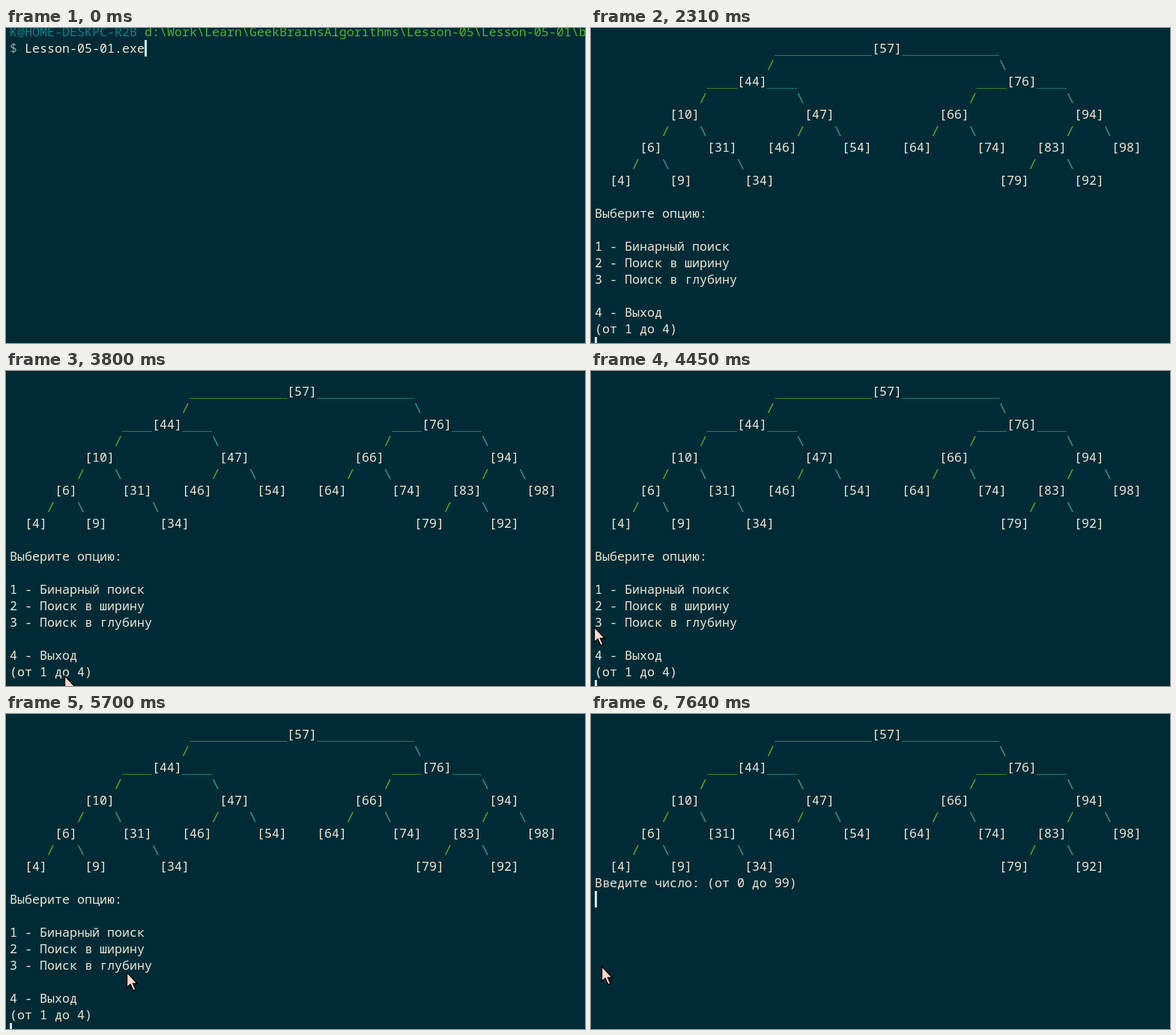
Recreate the animation shown at these times as an HTML page with a canvas. Size 773 by 420 pixels, loop 8000 ms.

```html
<!DOCTYPE html>
<html lang="ru">
<head>
<meta charset="utf-8">
<title>Terminal</title>
<style>
html, body { margin: 0; width: 100%; height: 100%; overflow: hidden; background: #002b36; }
canvas { display: block; }
</style>
</head>
<body>
<canvas id="stage" width="773" height="420"></canvas>
<script>
const ctx = document.getElementById('stage').getContext('2d');
const LOOP = 8000, CELL = 10, LINE = 22, LEFT = 5;
const COLOR = {
  back: '#002b36', text: '#eee8d5', green: '#4eb32b', cyan: '#2aa198',
  host: '#0b7f86', dollar: '#93a1a1', caret: '#cdeef5', pointer: '#ffd7cd'
};
const TEXT_FONT = `${CELL / 0.6}px "Noto Sans Mono", monospace`;
const ARM_FONT = `${CELL / 0.602}px "DejaVu Sans Mono", monospace`;

const MENU = [
  'Выберите опцию:', '',
  '1 - Бинарный поиск', '2 - Поиск в ширину', '3 - Поиск в глубину', '',
  '4 - Выход', '(от 1 до 4)'
];

const ARROW = new Path2D('M0 0V20L4.5 16L8.5 24.5L11.5 23L8 15H14Z');

function insert(node, value) {
  if (!node) return { value };
  const side = value < node.value ? 'left' : 'right';
  node[side] = insert(node[side], value);
  return node;
}
const root = '57 44 76 10 47 66 94 6 31 46 54 64 74 83 98 4 9 34 79 92'
  .split(' ').map(Number).reduce(insert, null);

function write(str, col, row, color, font = TEXT_FONT) {
  ctx.font = font;
  ctx.fillStyle = color;
  ctx.fillText(str, LEFT + col * CELL, 11 + row * LINE);
}

const label = node => `[${node.value}]`;

function drawTree(node, col, depth = 0) {
  const row = 1 + depth * 2;
  const arm = Math.max(0, Math.ceil(18 / 2 ** depth) - 5);
  const end = col + label(node).length;
  write(label(node), col, row, COLOR.text);
  if (node.left) {
    const elbow = col - arm - 1;
    write('_'.repeat(arm), col - arm, row, COLOR.green, ARM_FONT);
    write('/', elbow, row + 1, COLOR.green, ARM_FONT);
    drawTree(node.left, elbow - label(node.left).length, depth + 1);
  }
  if (node.right) {
    const elbow = end + arm;
    write('_'.repeat(arm), end, row, COLOR.cyan, ARM_FONT);
    write('\\', elbow, row + 1, COLOR.cyan, ARM_FONT);
    drawTree(node.right, elbow + 1, depth + 1);
  }
}

function drawPrompt() {
  write('K@HOME-DESKPC-R2B', 0, 0, COLOR.host);
  write(String.raw`d:\Work\Learn\GeekBrainsAlgorithms\Lesson-05\Lesson-05-01\bin`, 18, 0, COLOR.green);
  write('$', 0, 1, COLOR.dollar);
  write('Lesson-05-01.exe', 2, 1, COLOR.text);
}

// The caret is lit in every second interval counted from origin.
function drawCaret(t, row, col, origin, interval) {
  if (Math.floor((t - origin) / interval) % 2) return;
  ctx.fillStyle = COLOR.caret;
  ctx.fillRect(LEFT + col * CELL, row * LINE - 6, 3, LINE);
}

const progress = (t, from, to) => Math.min(1, Math.max(0, (t - from) / (to - from)));

// Sweep round the tree, against the clock, from below to its left side.
function sweep(t) {
  const angle = Math.PI * (0.5 - 1.5 * progress(t, 2520, 3060));
  return [497 + 212 * Math.cos(angle), 179 + 155 * Math.sin(angle)];
}

// Stops: [time, x, y]
const LEAVE = [[3060, 285, 179], [3320, 499, 259], [3350, 588, 385]];
const BROWSE = [
  [3780, 81, 408], [4360, 4, 341], [4630, 4, 341], [5400, 197, 342],
  [5520, 197, 342], [6260, 51, 352], [6720, 51, 352], [7270, 14, 336]
];

function follow(stops, t) {
  const next = stops.findIndex(stop => stop[0] > t);
  if (next < 0) return stops.at(-1).slice(1);
  const [from, x0, y0] = stops[next - 1], [to, x1, y1] = stops[next];
  const u = progress(t, from, to);
  return [x0 + (x1 - x0) * u, y0 + (y1 - y0) * u];
}

function drawPointer([x, y]) {
  ctx.save();
  ctx.translate(Math.round(x) + 0.5, Math.round(y) + 0.5);
  ctx.fillStyle = COLOR.pointer;
  ctx.strokeStyle = '#000';
  ctx.lineWidth = 1.4;
  ctx.fill(ARROW);
  ctx.stroke(ARROW);
  ctx.restore();
}

function draw(t) {
  ctx.fillStyle = COLOR.back;
  ctx.fillRect(0, 0, 773, 420);

  if (t < 980) drawPrompt();
  if (t >= 1220) drawTree(root, 37);
  if (t >= 1250 && t < 7610) MENU.forEach((line, i) => write(line, 0, 11 + i, COLOR.text));
  if (t >= 7610) write('Введите число: (от 0 до 99)', 0, 10, COLOR.text);

  if (t < 920) drawCaret(t, 1, 18, -380, 530);
  else if (t < 980) drawCaret(t, 2, 0, 920, 530);
  else if (t >= 1250 && t < 2310) drawCaret(t, 19, 0, 1250, 530);
  else if (t >= 2310 && t < 7610) drawCaret(t, 19, 0, 2310, 490);
  else if (t >= 7640) drawCaret(t, 11, 0, 7640, 530);

  if (t >= 2520 && t < 3060) drawPointer(sweep(t));
  else if (t >= 3060 && t < 3380) drawPointer(follow(LEAVE, t));
  else if (t >= 3780) drawPointer(follow(BROWSE, t));
}

const start = performance.now();
function tick() {
  draw((performance.now() - start) % LOOP);
  requestAnimationFrame(tick);
}
tick();
</script>
</body>
</html>
```
